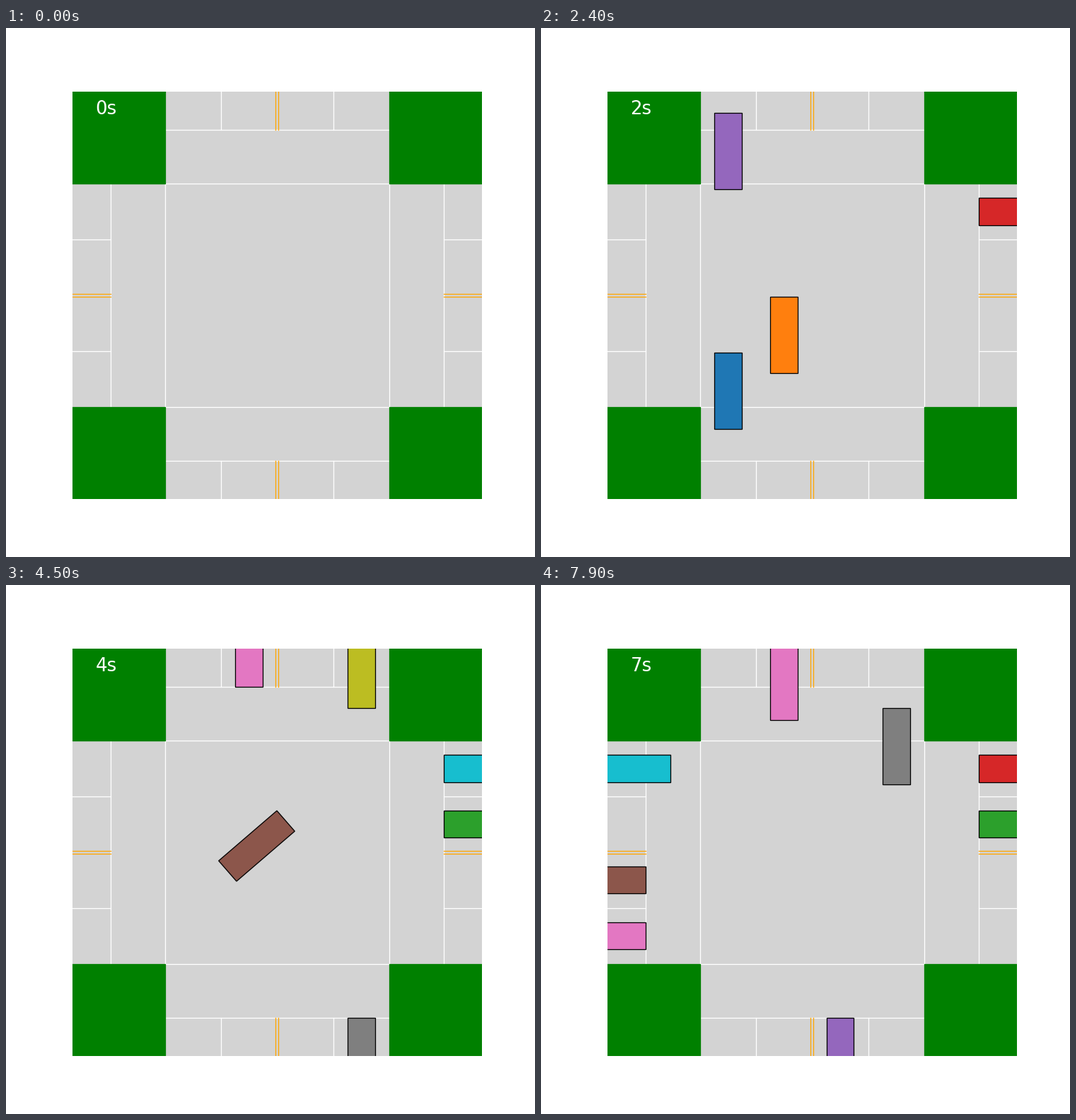
Recreate the animation shown at these times as a matplotlib script. Size 748 px wide and 748 px high, loop 8000 ms.

```python
import math

import matplotlib.pyplot as plt
from matplotlib.animation import FuncAnimation
from matplotlib.patches import Rectangle

FRAMES, INTERVAL = 80, 100
LANE = 79.4
ROAD = 2 * LANE            # half width of each road
STOP = 235.4               # distance of the stop lines from the centre
HALF = 289.85              # half of the visible area
LENGTH, WIDTH = 108.9, 38.6
SPEED = 326.6              # units per second
NEVER = 99

EAST, NORTH, WEST, SOUTH = range(4)
INNER, OUTER = -0.5 * LANE, -1.5 * LANE

# colour index, heading, lane, time it shows up, time it enters, turns left
CARS = [
    (2, EAST, INNER, 0.534, 0.534, False),
    (0, SOUTH, OUTER, 1.095, 1.095, False),
    (1, SOUTH, INNER, 1.34, 1.34, False),
    (3, WEST, OUTER, 1.4, 2.462, False),
    (4, SOUTH, OUTER, 1.43, 2.141, False),
    (5, EAST, INNER, 2.5, 3.665, True),
    (6, SOUTH, INNER, 2.7, 7.754, False),
    (8, NORTH, OUTER, 2.817, 2.817, False),
    (9, WEST, OUTER, 2.9, 6.233, False),
    (7, NORTH, OUTER, 3.15, 6.552, False),
    (2, WEST, INNER, 4.3, NEVER, False),
    (4, NORTH, INNER, 5.1, NEVER, False),
    (5, EAST, INNER, 5.2, NEVER, False),
    (6, EAST, OUTER, 5.3, NEVER, False),
    (3, WEST, OUTER, 6.567, NEVER, False),
]


def rotate(x, y, quarter):
    """Turn a point by quarter circles around the centre."""
    p = complex(x, y) * 1j ** quarter
    return p.real, p.imag


def line(start, end, quarter, color):
    xs, ys = zip(rotate(*start, quarter), rotate(*end, quarter))
    ax.plot(xs, ys, color=color, lw=1)


def path_length(lane, left):
    if not left:
        return 2 * HALF
    return 2 * (HALF - ROAD) + (ROAD - lane) * math.pi / 2


def pose(s, lane, left):
    """Centre and angle after distance s for a car coming from the left."""
    entry = HALF - ROAD
    if not left or s <= entry:
        return s - HALF, lane, 0
    radius = ROAD - lane
    angle = (s - entry) / radius
    if angle < math.pi / 2:
        return (radius * math.sin(angle) - ROAD,
                ROAD - radius * math.cos(angle), math.degrees(angle))
    return -lane, ROAD + s - entry - radius * math.pi / 2, 90


fig = plt.figure(figsize=(8, 8), dpi=93.5, facecolor="white")
ax = fig.add_axes([0.125, 0.11, 0.775, 0.77])
ax.set_xlim(-HALF, HALF)
ax.set_ylim(-HALF, HALF)
ax.axis("off")

ax.add_patch(Rectangle((-HALF, -HALF), 2 * HALF, 2 * HALF,
                       color="lightgray", lw=0))
for sx in (-1, 1):
    for sy in (-1, 1):
        ax.add_patch(Rectangle((sx * ROAD, sy * ROAD), sx * 200, sy * 200,
                               color="green", lw=1, zorder=3))

for q in range(4):
    line((-ROAD, -ROAD), (-ROAD, ROAD), q, "white")
    line((-STOP, -ROAD), (-STOP, ROAD), q, "white")
    for y in (-LANE, LANE):
        line((-HALF, y), (-STOP, y), q, "white")
for q in range(4):
    for y in (-2, 2):
        line((-HALF, y), (-STOP, y), q, "orange")

clock = ax.text(-241.85, 257.4, "0s", color="white", fontsize=20,
                family="DejaVu Sans", ha="center", va="baseline", zorder=6)

bodies = []
for color, *_ in CARS:
    body = Rectangle((0, 0), LENGTH, WIDTH, rotation_point="center",
                     fc=f"C{color}", ec="black", lw=1, zorder=5,
                     visible=False)
    bodies.append(ax.add_patch(body))


def draw(frame):
    t = frame * INTERVAL / 1000
    clock.set_text(f"{int(t)}s")
    for body, (_, heading, lane, shown, enter, left) in zip(bodies, CARS):
        s = max(0, t - enter) * SPEED
        visible = t >= shown and s < path_length(lane, left)
        body.set_visible(visible)
        if visible:
            x, y, angle = pose(s, lane, left)
            x, y = rotate(x, y, heading)
            body.set_xy((x - LENGTH / 2, y - WIDTH / 2))
            body.angle = angle + 90 * heading
            body.stale = True
    return [clock, *bodies]


anim = FuncAnimation(fig, draw, frames=FRAMES, interval=INTERVAL,
                     init_func=lambda: draw(0), repeat=True, repeat_delay=0)
plt.show()
```
